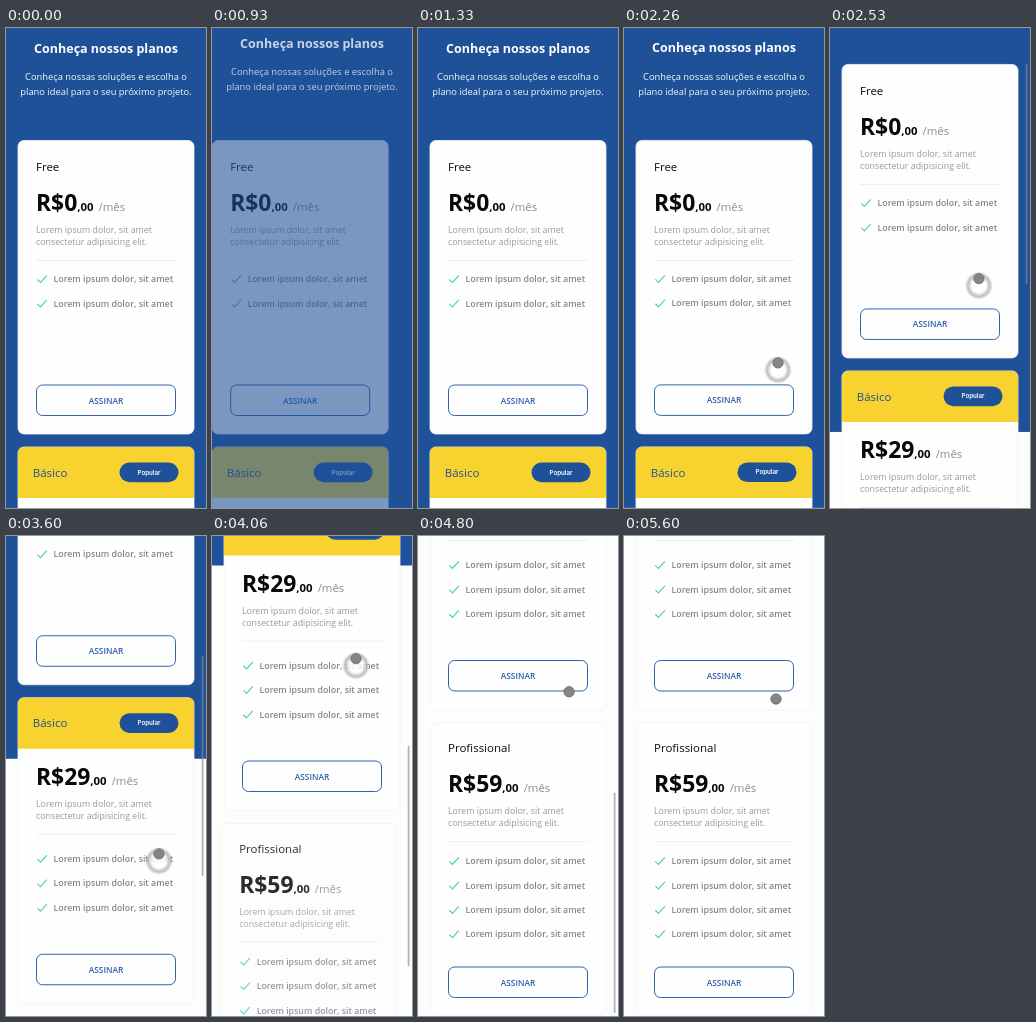
Recreate the animation shown at these times as an HTML page. Size 200 by 480 pixels, loop 7060 ms.

```html
<!DOCTYPE html>
<html lang="pt-BR">
<head>
<meta charset="utf-8">
<title>Planos</title>
<style>
  html, body { margin: 0; width: 100%; height: 100%; overflow: hidden; background: #fdfdfe; }
  svg { display: block; width: 100%; height: 100%; }
  text { font-family: "Open Sans", "Noto Sans", sans-serif; }
  .title { font-size: 12.5px; font-weight: 700; fill: #fff; text-anchor: middle; }
  .intro { font-size: 9.35px; fill: #f6f9fd; text-anchor: middle; }
  .plan { font-size: 11.5px; font-weight: 500; fill: #0c0c10; }
  .price { font-size: 22.9px; font-weight: 700; fill: #08080c; }
  .cents { font-size: 11.4px; }
  .month { font-size: 11.4px; font-weight: 400; fill: #8b8b95; }
  .about { font-size: 8.82px; fill: #9797a0; }
  .item { font-size: 8.8px; font-weight: 600; fill: #858590; }
  .check { fill: none; stroke: #56d3a8; stroke-width: 1.2; }
  .button { fill: none; stroke: #2f62ab; stroke-width: 1; }
  .label { font-size: 8.3px; font-weight: 600; fill: #2b5ca5; text-anchor: middle; }
  .pill { font: 600 6.2px Inter, sans-serif; fill: #fff; text-anchor: middle; }
</style>
</head>
<body>
<svg viewBox="0 0 200 480">
  <defs>
    <radialGradient id="glow">
      <stop offset="0" stop-color="#fff" stop-opacity=".85"/>
      <stop offset=".5" stop-color="#fff" stop-opacity=".8"/>
      <stop offset=".78" stop-color="#aaa" stop-opacity=".75"/>
      <stop offset="1" stop-color="#aaa" stop-opacity="0"/>
    </radialGradient>
  </defs>
  <g id="page">
    <rect y="-1" width="200" height="481" fill="#1f5199"/>
    <g id="header">
      <text class="title" x="100" y="24.5">Conheça nossos planos</text>
      <text class="intro" x="100" y="51.8">Conheça nossas soluções e escolha o</text>
      <text class="intro" x="100" y="67.4">plano ideal para o seu próximo projeto.</text>
    </g>
    <g id="cards"></g>
    <g id="lastCard"></g>
  </g>
  <rect id="bar" x="195.7" width="1.8" rx=".9" fill="#8a8a8e"/>
  <g id="cursor">
    <circle id="ring" cy="7" r="14" fill="url(#glow)"/>
    <circle r="5.2" fill="#858585" stroke="#6c6c6c" stroke-width=".8"/>
  </g>
</svg>
<script>
const LOOP = 7060, VIEW = 480, PAGE = 1031;
const el = id => document.getElementById(id);

const frame = (top, bottom) =>
  `<rect x="12" y="${top}" width="176" height="${bottom - top}" rx="6" fill="#fefefe" stroke="#f1f1f5" stroke-width=".8"/>`;

const text = (cls, x, y, s) => `<text class="${cls}" x="${x}" y="${y}">${s}</text>`;

function listItem(y) {
  return `<path class="check" d="M31.3 ${y + .5}l3.2 3 6.3-7"/>` + text('item', 47.5, y + 3.2, 'Lorem ipsum dolor, sit amet');
}

// base: price baseline; list: centre of the first item
function content(base, price, list, count, button) {
  let out = `<text class="price" x="30" y="${base}">R$${price}<tspan class="cents">,00</tspan><tspan class="month" dx="5">/mês</tspan></text>`;
  out += text('about', 30, base + 22.4, 'Lorem ipsum dolor, sit amet');
  out += text('about', 30, base + 34.4, 'consectetur adipisicing elit.');
  out += `<path d="M30 ${base + 49.5}H171" stroke="#efeff2"/>`;
  for (let i = 0; i < count; i++) out += listItem(list + i * 24.4);
  out += `<rect class="button" x="30.5" y="${button}" width="139" height="30.5" rx="6"/>`;
  return out + text('label', 100, button + 18.5, 'ASSINAR');
}

el('cards').innerHTML =
  frame(112.5, 406) + text('plan', 30, 143, 'Free') + content(183, 0, 251, 2, 357) +
  frame(419, 725) +
  '<path d="M12 470V425a6 6 0 0 1 6-6H182a6 6 0 0 1 6 6V470z" fill="#f8d330"/>' +
  '<text class="plan" x="26.7" y="448.7" style="fill:#1f5199">Básico</text>' +
  '<rect x="113.5" y="434.5" width="59" height="19.7" rx="9.85" fill="#1f5199"/>' +
  text('pill', 143, 446.5, 'Popular') + content(506, 29, 580, 3, 675.5);
el('lastCard').innerHTML =
  frame(738, 1030) + text('plan', 30, 767, 'Profissional') + content(807, 59, 876, 4, 982);

// Hermite interpolation through [time, value, velocity per ms]
function track(keys, t) {
  if (t <= keys[0][0]) return keys[0][1];
  const i = keys.findIndex(k => k[0] > t);
  if (i < 0) return keys[keys.length - 1][1];
  const [t0, a, va = 0] = keys[i - 1], [t1, b, vb = 0] = keys[i];
  const d = t1 - t0, u = (t - t0) / d, w = 1 - u;
  return a * w * w * (1 + 2 * u) + b * u * u * (3 - 2 * u) + d * u * w * (va * w - vb * u);
}

// cubic-bezier(.5, 0, 0, 1)
function ease(x) {
  if (x <= 0) return 0;
  if (x >= 1) return 1;
  let lo = 0, hi = 1;
  for (let i = 0; i < 24; i++) {
    const s = (lo + hi) / 2;
    if (1.5 * s * (1 - s) ** 2 + s ** 3 < x) lo = s; else hi = s;
  }
  return 3 * (1 - lo) * lo * lo + lo ** 3;
}

const scrollKeys = [[2260, 0, .1], [2860, 198, .25], [3400, 256], [3590, 256, .1], [4060, 450, .5], [4400, 551]];
const cursorX = [[2260, 154], [2860, 142], [3500, 153], [3600, 153], [4060, 144], [4250, 144], [4950, 152]];
const cursorY = [[2200, 338], [2260, 335, -.1], [2860, 141, -.1], [2960, 136], [3480, 321], [3600, 318, -.12],
  [4060, 123, -.35], [4220, 96], [4950, 163]];
const ringKeys = [[2190, 1], [2700, 1], [2850, 0], [3430, 0], [3580, 1], [4080, 1], [4250, 0]];
const barKeys = [[2260, 0], [2360, 1], [4850, 1], [5300, 0]];

function reveal(id, t, start, dx, dy) {
  const p = t < 655 ? 1 : ease((t - start) / 600), rest = -20 * (1 - p);
  el(id).setAttribute('transform', `translate(${dx * rest} ${dy * rest})`);
  el(id).setAttribute('opacity', p);
}

function draw(now) {
  const t = now % LOOP, scroll = track(scrollKeys, t);
  el('page').setAttribute('transform', `translate(0 ${-scroll})`);
  reveal('header', t, 682, 0, 1);
  reveal('cards', t, 756, 1, 0);
  reveal('lastCard', t, 3757, 1, 0);

  el('bar').setAttribute('y', scroll * VIEW / PAGE);
  el('bar').setAttribute('height', VIEW * VIEW / PAGE - 3);
  el('bar').setAttribute('opacity', track(barKeys, t) * .65);

  el('cursor').setAttribute('transform', `translate(${track(cursorX, t)} ${track(cursorY, t)})`);
  el('cursor').setAttribute('opacity', t < 2195 ? 0 : 1);
  el('ring').setAttribute('opacity', track(ringKeys, t));
}

const begin = performance.now();
function tick() {
  draw(performance.now() - begin);
  requestAnimationFrame(tick);
}
tick();
</script>
</body>
</html>
```
